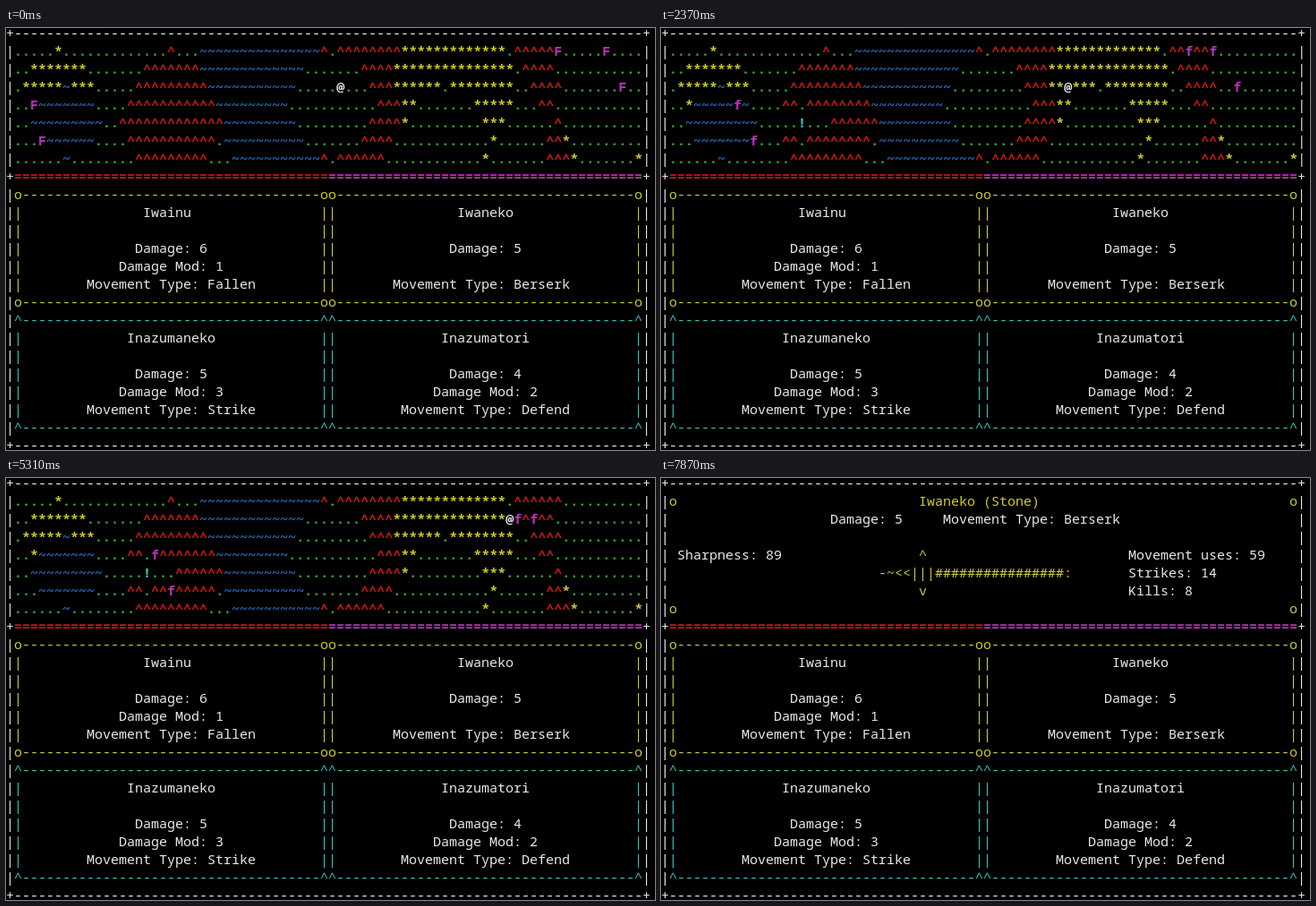
These frames come from a looping animation (725x471 px, 8 s). An HTML page:

```html
<!DOCTYPE html>
<html lang="en">
<head>
<meta charset="utf-8">
<title>Katana roguelike</title>
<style>
html, body { margin: 0; width: 100%; height: 100%; overflow: hidden; background: #000; }
#stage { position: relative; width: 100%; height: 100%; overflow: hidden; contain: strict; }
#screen {
  position: absolute; left: 0; top: -5px; margin: 0; white-space: pre;
  font: 500 15px/20px "Noto Sans Mono", "DejaVu Sans Mono", monospace;
  font-variant-ligatures: none; color: #e8e8e8;
}
#screen div { height: 20px; }
.red { color: #c81616; }
.green { color: #35a52c; }
.yellow { color: #cccb30; }
.blue { color: #1f70c8; }
.magenta { color: #c030c0; }
.cyan { color: #2ec4c0; }
.bold { font-weight: bold; }
</style>
</head>
<body>
<div id="stage"><pre id="screen"></pre></div>
<script>
const COLS = 80, ROWS = 24, LOOP = 8000;
const MESSAGE_START = 1880, MESSAGE_END = 2040, DETAILS_START = 7870;

// Rows are filled up with grass on the right.
const TERRAIN = [
  '.....*.............^...~~~~~~~~~~~~~~~^.^^^^^^^^*************.^^^^^^',
  '..*******.......^^^^^^^~~~~~~~~~~~~~.......^^^^***************.^^^^',
  '.*****~***.....^^^^^^^^^~~~~~~~~~~~.........^^^******.********..^^^^',
  '..*~~~~~~~....^^^^^^^^^^^~~~~~~~~~...........^^^**.......*****...^^',
  '..~~~~~~~~~..^^^^^^^^^^^^^~~~~~~~~~.........^^^^*.........***......^',
  '...~~~~~~~....^^^^^^^^^^^.~~~~~~~~~~.......^^^^............*......^^*',
  '......~........^^^^^^^^^...~~~~~~~~~~~^.^^^^^^............*.......^^^*.......*'
].map(row => row.padEnd(COLS - 2, '.'));
const TINT = { '.': 'green bold', '^': 'red bold', '~': 'blue bold', '*': 'yellow bold' };

// Turns come as slow key presses or as quick key repeat.
const SLOW = 330, QUICK = 160;
const burst = (from, count, gap) => Array.from({ length: count }, (_, i) => from + i * gap);
const TURNS = [
  burst(0, 2, 500), burst(830, 6, QUICK), burst(MESSAGE_END, 2, SLOW), burst(2870, 8, QUICK),
  burst(4400, 2, SLOW), burst(4920, 3, 195), burst(5650, 1, SLOW), burst(6050, 4, SLOW)
].flat();

// Columns are reached on these turns; each actor may change row once.
const BEATS = [0, 12, 17, 22, 27];
const HERO = { cols: [41, 54, 59, 62, 63], row: 3, newRow: 2, shift: 17 };
const FOES = [
  { cols: [3, 12, 15, 18, 21], row: 4 },
  { cols: [4, 14, 17, 20, 24], row: 6 },
  { cols: [68, 64, 62], row: 1, newRow: 2, shift: 17, end: 19 },
  { cols: [74, 65, 63], row: 1, newRow: 2, shift: 17, end: 23 },
  { cols: [76, 69, 67, 65], row: 3, newRow: 2, shift: 22, end: 25 }
];
const CRATER = { turn: 8, row: 5, col: 17 };

const card = (name, damage, mod, move) =>
  [name, '', 'Damage: ' + damage, mod && 'Damage Mod: ' + mod, 'Movement Type: ' + move];
const STONE = [card('Iwainu', 6, '1', 'Fallen'), card('Iwaneko', 5, '', 'Berserk')];
const LIGHTNING = [card('Inazumaneko', 5, '3', 'Strike'), card('Inazumatori', 4, '2', 'Defend')];

const screen = document.getElementById('screen');
const lines = Array.from({ length: ROWS }, () => screen.appendChild(document.createElement('div')));
let grid;

function put(row, col, text, tint = '') {
  [...text].forEach((ch, i) => { grid[row][col + i] = { ch, tint }; });
}

function drawFrame() {
  for (let r = 0; r < ROWS; r++) {
    const edge = r === 0 || r === ROWS - 1;
    const side = edge || r === 8 ? '+' : '|';
    put(r, 0, side + (edge ? '-' : ' ').repeat(COLS - 2) + side);
  }
}

function drawCards(cards, row, corner, tint) {
  cards.forEach((texts, i) => {
    const col = 1 + 39 * i;
    const border = corner + '-'.repeat(37) + corner;
    put(row, col, border, tint);
    put(row + 6, col, border, tint);
    texts.forEach((text, k) => {
      const r = row + 1 + k;
      put(r, col, '|', tint);
      put(r, col + 38, '|', tint);
      put(r, col + 1 + Math.floor((37 - text.length) / 2), text);
    });
  });
}

function drawBars() {
  put(8, 1, '='.repeat(39), 'red bold');
  put(8, 40, '='.repeat(39), 'magenta bold');
}

function columnAt(cols, turn) {
  const i = BEATS.findLastIndex(beat => beat <= turn);
  if (i >= cols.length - 1) return cols[cols.length - 1];
  const part = (turn - BEATS[i]) / (BEATS[i + 1] - BEATS[i]);
  return cols[i] + Math.trunc((cols[i + 1] - cols[i]) * part);
}

function drawActor({ cols, row, newRow, shift = Infinity, end = Infinity }, turn, ch, tint) {
  if (turn < end) put(turn < shift ? row : newRow, columnAt(cols, turn), ch, tint);
}

function drawMap(turn) {
  const struck = turn >= CRATER.turn;
  TERRAIN.forEach((text, r) => [...text].forEach((ch, c) => {
    const reach = Math.abs(r + 1 - CRATER.row) + Math.abs(c + 1 - CRATER.col) / 3;
    const seen = struck && reach <= 1 ? '.' : ch;
    put(r + 1, c + 1, seen, TINT[seen]);
  }));
  if (struck) put(CRATER.row, CRATER.col, '!', 'cyan bold');
  FOES.forEach(foe => drawActor(foe, turn, turn ? 'f' : 'F', 'magenta bold'));
  drawActor(HERO, turn, '@', 'bold');
}

function drawDetails() {
  for (const r of [1, 7]) {
    put(r, 1, 'o', 'yellow');
    put(r, 78, 'o', 'yellow');
  }
  put(1, 32, 'Iwaneko (Stone)', 'yellow');
  put(2, 21, 'Damage: 5     Movement Type: Berserk');
  put(4, 2, 'Sharpness: 89');
  put(4, 32, '^', 'yellow');
  put(5, 27, '-~<<|||' + '#'.repeat(16) + ':', 'yellow');
  put(6, 32, 'v', 'yellow');
  ['Movement uses: 59', 'Strikes: 14', 'Kills: 8'].forEach((text, i) => put(4 + i, 58, text));
}

// Turns each grid row into spans of one tint.
function flush() {
  grid.forEach((cells, r) => {
    lines[r].replaceChildren();
    let span, tint;
    for (const cell of cells) {
      if (!span || cell.tint !== tint) {
        span = lines[r].appendChild(document.createElement('span'));
        span.className = tint = cell.tint;
      }
      span.textContent += cell.ch;
    }
  });
}

function render(turn, message, details) {
  grid = Array.from({ length: ROWS }, () => []);
  drawFrame();
  drawCards(STONE, 9, 'o', 'yellow');
  drawCards(LIGHTNING, 16, '^', 'cyan');
  if (details) drawDetails();
  else drawMap(turn);
  if (message) put(8, 23, 'A katana strikes the earth. (exit)');
  else drawBars();
  flush();
}

let shown = '';
const start = performance.now();
function tick() {
  const t = (performance.now() - start) % LOOP;
  const turn = TURNS.findLastIndex(time => time <= t);
  const message = t >= MESSAGE_START && t < MESSAGE_END;
  const details = t >= DETAILS_START;
  const state = [turn, message, details].join();
  if (state !== shown) {
    shown = state;
    render(turn, message, details);
  }
  requestAnimationFrame(tick);
}
tick();
</script>
</body>
</html>
```
